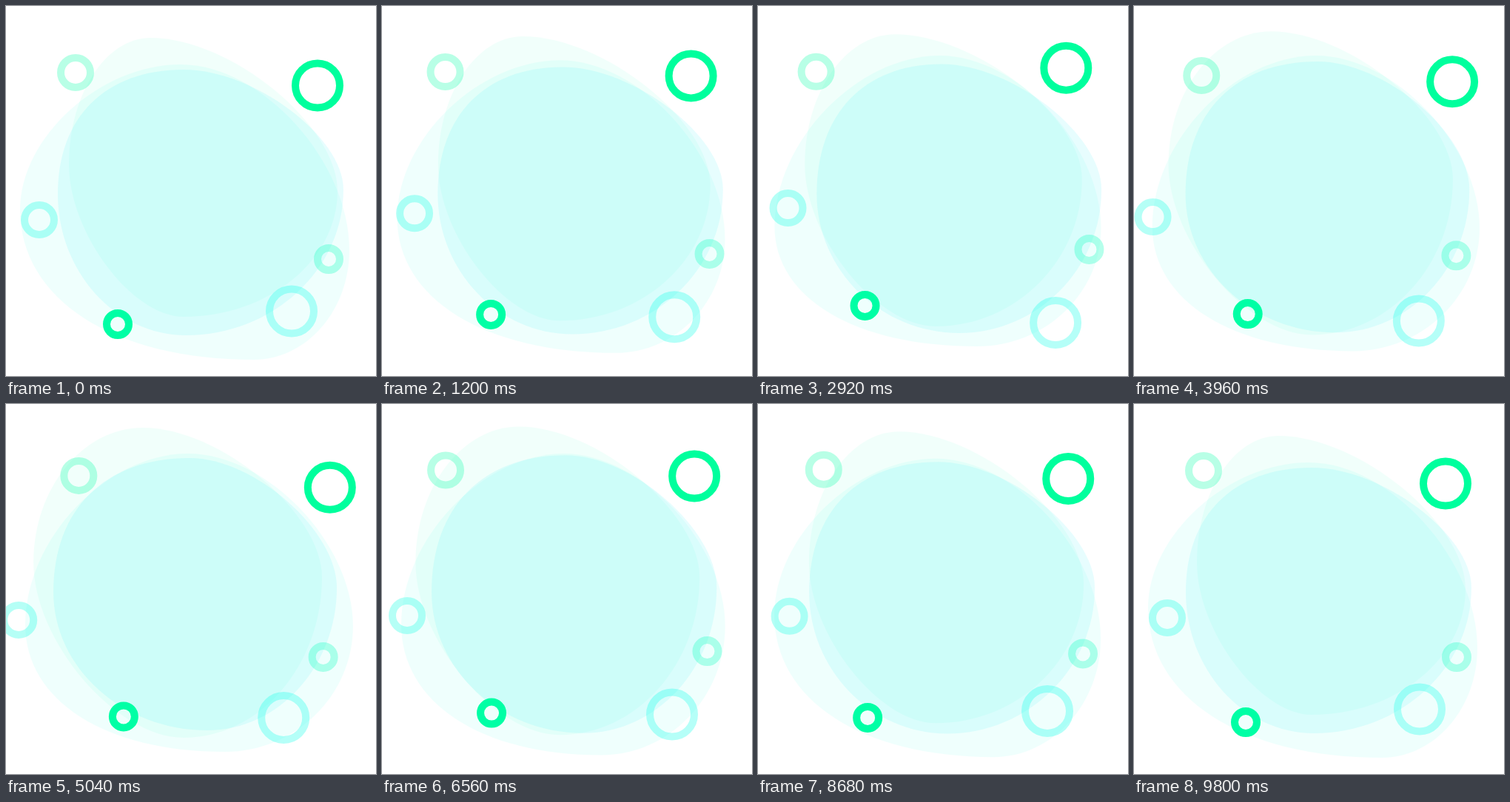
An HTML page for the animation above (9.88 s loop, 500 by 500 pixels).

```html
<!DOCTYPE html>
<html lang="en">
<head>
<meta charset="utf-8">
<title>Floating blobs and rings</title>
<style>
  html, body { margin: 0; width: 100%; height: 100%; overflow: hidden; background: #fff; }
  svg { display: block; width: 100vw; height: 100vh; }
</style>
</head>
<body>
<svg viewBox="0 0 500 500"></svg>
<script>
const LOOP = 9880, END = 9800, STEP = 40, KEYS = 4;

// Coordinates list their value at each quarter of the loop; a short list holds its last value.
// A blob is four extreme points joined by arcs; bend sets how full each arc is.
const blobs = [
  { fill: 'rgba(0,255,185,.054)', bend: [.55, .43, .55, .45],
    left: { x: [85, 66, 37, 48], y: [214] },
    top: { x: [195, 185], y: [43, 39, 32, 30] },
    right: { x: [448, 439, 427, 430], y: [250, 234] },
    bottom: { x: [240], y: [420, 431, 451, 446] } },
  { fill: 'rgba(0,250,225,.063)', bend: [.5, .48, .55, .6],
    left: { x: [19, 22, 26], y: [275, 298] },
    top: { x: [236, 246], y: [79, 67] },
    right: { x: [464, 463, 469, 462], y: [330, 300] },
    bottom: { x: [335, 296], y: [478, 459, 470, 476] } },
  { fill: 'rgba(0,235,240,.094)', bend: [.62, .44, .55, .55],
    left: { x: [70, 81, 64, 68], y: [254] },
    top: { x: [240, 248], y: [86, 79, 73, 68] },
    right: { x: [456, 466, 447, 454], y: [248] },
    bottom: { x: [243, 272], y: [445, 442, 441, 446] } }
];

const rings = [
  { r: 20, stroke: 'rgba(0,255,165,.28)', x: [94, 76.5, 98.5, 82], y: [90, 88, 97, 87] },
  { r: 30, stroke: '#00ff9d', x: [421, 414, 438, 417], y: [107.5, 80.5, 113, 92.5] },
  { r: 15, stroke: '#00ffa5', x: [151, 143, 159, 144.5], y: [430, 403, 422.5, 416] },
  { r: 20, stroke: 'rgba(0,255,225,.29)', x: [45, 43, 17, 39.5], y: [289, 271, 292, 284] },
  { r: 30, stroke: 'rgba(0,255,232,.29)', x: [386, 405, 375, 397.5], y: [412.5, 428.5, 424, 418] },
  { r: 15, stroke: 'rgba(0,255,185,.29)', x: [436, 449.5, 428.5, 443], y: [342, 327.5, 342, 331.5] }
];

const mix = (a, b, k) => a + (b - a) * k;
const ease = s => s * s * (3 - 2 * s);

// Value of a coordinate at a phase from 0 to 1, easing from key to key.
function at(list, phase) {
  const key = i => list[Math.min(i % KEYS, list.length - 1)];
  const i = Math.floor(phase * KEYS);
  return mix(key(i), key(i + 1), ease(phase * KEYS - i));
}

const svg = document.querySelector('svg');
function set(el, attrs) {
  for (const k in attrs) el.setAttribute(k, attrs[k]);
}
function add(tag, attrs) {
  const el = document.createElementNS('http://www.w3.org/2000/svg', tag);
  set(el, attrs);
  return svg.appendChild(el);
}

// Closed curve through the extremes, with level or upright tangents at each.
function outline(points, bend) {
  let d = `M${points[0]}`;
  points.forEach(([x, y], i) => {
    const [u, v] = points[(i + 1) % points.length], k = bend[i];
    d += i % 2
      ? `C${mix(x, u, k)} ${y} ${u} ${mix(v, y, k)} ${u} ${v}`
      : `C${x} ${mix(y, v, k)} ${mix(u, x, k)} ${v} ${u} ${v}`;
  });
  return d + 'Z';
}

const movers = [];
for (const { fill, bend, left, top, right, bottom } of blobs) {
  const el = add('path', { fill });
  movers.push(p => set(el, {
    d: outline([left, top, right, bottom].map(({ x, y }) => [at(x, p), at(y, p)]), bend)
  }));
}
for (const { r, stroke, x, y } of rings) {
  const el = add('circle', { r, stroke, fill: 'none', 'stroke-width': 10 });
  movers.push(p => set(el, { cx: at(x, p), cy: at(y, p) }));
}

const start = performance.now();
function draw(now) {
  const ms = Math.max(0, now - start) % LOOP;
  const phase = Math.min(END, Math.floor(ms / STEP) * STEP) / END;
  movers.forEach(move => move(phase));
  requestAnimationFrame(draw);
}
draw(start);
</script>
</body>
</html>
```
